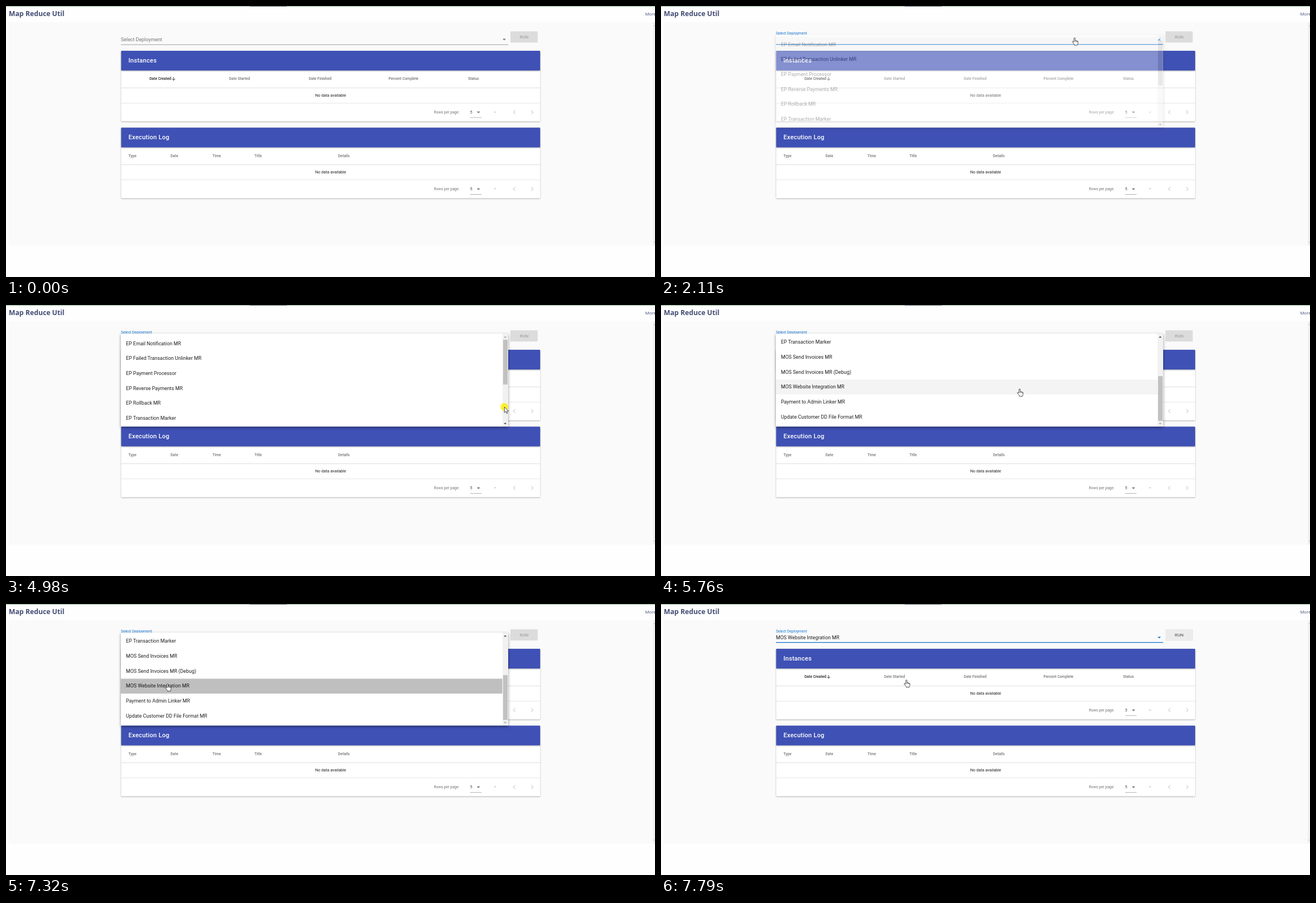
An HTML page for the animation above (8 s loop, 1158 by 484 pixels).

```html
<!DOCTYPE html>
<html lang="en">
<head>
<meta charset="utf-8">
<title>Map Reduce Util</title>
<style>
  html, body { margin: 0; width: 100%; height: 100%; overflow: hidden; background: #fefefe; }
  svg { display: block; width: 1158px; height: 484px; font-family: Roboto, "Open Sans", sans-serif; }
  .brand { font-family: "Open Sans", sans-serif; fill: #434b73; }
  .card { fill: #fff; filter: drop-shadow(0 1px 1px rgba(0,0,0,.3)); }
  .bar { fill: #3f51b5; filter: drop-shadow(0 1px 1px rgba(0,0,0,.28)); }
  .panel { fill: #fff; filter: drop-shadow(0 2px 2.5px rgba(0,0,0,.42)); }
</style>
</head>
<body>
<svg id="stage" viewBox="0 0 1158 484">
  <defs>
    <clipPath id="listClip"><rect x="205" y="51" width="681" height="166"/></clipPath>
    <clipPath id="rowClip"><rect x="205" y="133.4" width="680.6" height="26.6"/></clipPath>
  </defs>
  <rect x="5" y="29" width="1149" height="399" fill="#fafafa"/>
  <rect x="1154" y="29" width="4" height="399" fill="#f1f1f1"/>
  <path d="M1156 36l2-2v2zM1156 421l2 2v-2z" fill="#a0a0a0"/>
  <rect width="1158" height="1" fill="#83b48f"/>
  <rect x="435" width="66" height="1" fill="#4d5a5c"/>
  <text class="brand" x="5" y="18" font-size="12.2" font-weight="700">Map Reduce Util</text>
  <text class="brand" x="1140.5" y="17.3" font-size="7.8">More</text>

  <g id="page"></g>

  <g id="field">
    <text id="label" x="205"></text>
    <text id="value" x="205" y="63" font-size="8.88" fill="#212121">MOS Website Integration MR</text>
    <rect id="line" x="205" width="691"/>
    <path id="caret" d="M-3-1.5h6l-3 3z"/>
  </g>
  <g id="run">
    <rect id="runBox" x="900" y="45.3" width="48.7" height="20" rx="1"/>
    <text id="runText" x="924.5" y="58" font-size="7.77" font-weight="500" text-anchor="middle">RUN</text>
  </g>

  <g id="menu">
    <rect class="panel" x="205" y="51" width="691" height="166" rx="1"/>
    <g clip-path="url(#listClip)">
      <g id="list">
        <rect id="hover" x="205" width="681" height="26.64" fill="#f4f4f4"/>
      </g>
    </g>
    <circle id="ripple" cx="288" cy="145" fill="#000" fill-opacity=".218" clip-path="url(#rowClip)"/>
    <rect x="886" y="51" width="10" height="166" fill="#f1f1f1"/>
    <rect id="thumb" x="887" width="8" height="80"/>
    <path id="up" d="M888.2 58.3h5l-2.5-2.6z"/>
    <path id="down" d="M888.2 210.7h5l-2.5 2.6z"/>
  </g>

  <circle id="press" r="7" fill="#fbee10" fill-opacity=".85"/>
  <path id="arrow" d="M0 0V10.2L2.4 8L4.1 11.8L5.7 11.1L4.1 7.4H7.3Z"
        fill="#fff" stroke="#222" stroke-width=".8"/>
  <g id="hand" stroke="#222" stroke-width=".8" stroke-linejoin="round">
    <path fill="#fff" d="M-1.2 7.4V1a1.1 1.1 0 0 1 2.2 0V5q1.1-.8 2 .2q1.1-.5 1.7.5q1.3-.3 1.3 1.1V9.2
      q0 1.2-1 2.6V13H-.4V12Q-2.2 10-4 7.4Q-4.5 6-3.2 5.9Q-2.2 6.2-1.2 7.4Z"/>
    <path fill="none" d="M1 5v2.4M3 5.2v2.2M4.7 5.7v1.9" stroke-width=".6"/>
  </g>
</svg>
<script>
const LOOP = 8000, ROW = 26.64, BLUE = '#1976d2';
const $ = id => document.getElementById(id);

function add(parent, tag, attrs, text) {
  const el = document.createElementNS('http://www.w3.org/2000/svg', tag);
  set(el, attrs);
  if (text) el.textContent = text;
  return parent.appendChild(el);
}
function set(el, attrs) {
  for (const k in attrs) el.setAttribute(k, attrs[k]);
}
const show = (el, on) => el.setAttribute('visibility', on ? 'visible' : 'hidden');

// columns: [x, label]; the sorted column is darker and has an arrow
function card(top, title, columns, sorted) {
  const g = add($('page'), 'g', { transform: `translate(0 ${top})` });
  const rect = (x, y, width, height, more) => add(g, 'rect', { x, y, width, height, ...more });
  const text = (x, y, size, fill, s, more) => add(g, 'text', { x, y, 'font-size': size, fill, ...more }, s);
  rect(205.5, 0, 747.5, 126, { class: 'card', rx: 1 });
  rect(205.5, 0, 747.5, 35.2, { class: 'bar', rx: 1 });
  text(218.5, 21.2, 11.1, '#fff', title, { 'font-weight': 500, 'letter-spacing': '.02em' });
  for (const [x, s] of columns)
    text(x, 52.4, 6.66, s === sorted ? '#212121' : '#757575', s, { 'font-weight': 500 });
  if (sorted)
    add(g, 'path', { d: 'M299 47v5.6M296.3 50l2.7 2.7 2.7-2.7', fill: 'none', stroke: '#212121', 'stroke-width': .9 });
  for (const y of [65.8, 93]) rect(205.5, y, 747.5, .8, { fill: y < 70 ? '#d6d6d6' : '#e0e0e0' });
  text(579.3, 82, 7.2, '#212121', 'No data available', { 'text-anchor': 'middle' });
  text(763.6, 111.7, 6.66, '#757575', 'Rows per page:');
  text(828, 111.7, 6.66, '#424242', '5');
  text(870.4, 111.7, 6.66, '#757575', '–');
  add(g, 'path', { d: 'M840 108.5h6l-3 3z', fill: '#757575' });
  rect(828, 118.8, 20.6, .7, { fill: '#949494' });
  add(g, 'path', { d: 'M908.5 106.3l-3.2 3.3 3.2 3.3M937.3 106.3l3.2 3.3-3.2 3.3',
    fill: 'none', stroke: '#b4b4b4', 'stroke-width': 1 });
}

card(80, 'Instances', [[256, 'Date Created'], [398, 'Date Started'], [540.2, 'Date Finished'],
  [682.5, 'Percent Complete'], [824.5, 'Status']], 'Date Created');
card(217.2, 'Execution Log', [[218.6, 'Type'], [293.5, 'Date'], [368.5, 'Time'],
  [443.3, 'Title'], [592.5, 'Details']]);

['EP Email Notification MR', 'EP Failed Transaction Unlinker MR', 'EP Payment Processor',
 'EP Reverse Payments MR', 'EP Rollback MR', 'EP Transaction Marker', 'MOS Send Invoices MR',
 'MOS Send Invoices MR (Debug)', 'MOS Website Integration MR', 'Payment to Admin Linker MR',
 'Update Customer DD File Format MR'].forEach((s, i) =>
  add($('list'), 'text', { x: 214, y: 71.7 + i * ROW, 'font-size': 8.88, fill: '#212121' }, s));
$('label').textContent = 'Select Deployment';

const START = { arrow: null, hand: null, press: false, float: 0, focus: false, open: false,
  line: '#949494', menu: 0, hover: -1, scroll: 0, thumb: '#c1c1c1', ripple: 0, value: false, run: 0 };
const arrow = (x, y) => ({ arrow: [x, y], hand: null });
const hand = (x, y) => ({ hand: [x, y], arrow: null });

// each step changes part of the state and holds until the next
const STEPS = [
  [390, arrow(907.5, 395)],
  [520, arrow(574.5, 106)],
  [840, { ...hand(738, 57), line: '#606060' }],
  [1030, { line: '#212121' }],
  [1340, { press: true }],
  [1640, { focus: true, float: .5, line: BLUE }],
  [1800, { float: 1, press: false }],
  [1950, { open: true, menu: .08, hover: 0 }],
  [2110, { menu: .36 }],
  [2260, { menu: .8 }],
  [2420, { menu: 1 }],
  [3340, arrow(910.5, 165.3)],
  [3660, { ...arrow(926, 152), hover: -1 }],
  [3820, arrow(945, 147.5)],
  [3980, arrow(942, 157)],
  [4150, arrow(930, 170)],
  [4320, arrow(912, 180)],
  [4500, arrow(895, 182)],
  [4670, arrow(889.3, 182)],
  [4830, { press: true }],
  [5130, { press: false, scroll: 135.4, thumb: '#a8a8a8' }],
  [5760, { ...hand(640, 150), thumb: '#c1c1c1', hover: 8 }],
  [5920, { ...hand(463.5, 128), hover: 7 }],
  [6210, { ...hand(400, 125), hover: 7 }],
  [6370, { ...hand(318, 138), hover: 8 }],
  [6520, hand(288.5, 142.5)],
  [6680, { press: true }],
  [6860, { ripple: 130 }],
  [7010, { ripple: 390 }],
  [7170, { ripple: 593 }],
  [7320, { ripple: 640, press: false, value: true }],
  [7490, { menu: .6, open: false }],
  [7640, { ...hand(352, 139), menu: .12, run: .4 }],
  [7790, { ...hand(438, 135.7), menu: 0, run: 1 }],
];

function place(el, at) {
  show(el, at);
  if (at) set(el, { transform: `translate(${at})` });
}

function draw(t) {
  const s = { ...START };
  for (const [at, change] of STEPS) if (t >= at) Object.assign(s, change);

  set($('label'), { y: 63 - 12.5 * s.float, 'font-size': 8.88 - 2.22 * s.float, fill: s.focus ? BLUE : '#757575' });
  show($('value'), s.value);
  set($('line'), { y: s.focus ? 68 : 68.6, height: s.focus ? 1.3 : .9, fill: s.line });
  set($('caret'), { transform: `translate(889 60)${s.open ? ' rotate(180)' : ''}`, fill: s.focus ? BLUE : '#757575' });

  const mix = (a, b) => `rgb(${Array(3).fill(Math.round(a + (b - a) * s.run))})`;
  set($('runBox'), { fill: mix(220, 236) });
  set($('runText'), { fill: mix(166, 108) });
  $('runBox').style.filter = s.run ? 'drop-shadow(0 .6px .6px rgba(0,0,0,.15))' : 'none';

  show($('menu'), s.menu > 0);
  set($('menu'), { opacity: s.menu });
  set($('list'), { transform: `translate(0 ${-s.scroll})` });
  set($('hover'), { y: 55.4 + s.hover * ROW, opacity: s.hover < 0 ? 0 : 1 });
  set($('ripple'), { r: s.ripple });
  set($('thumb'), { y: s.scroll ? 127 : 62, fill: s.thumb });
  set($('up'), { fill: s.scroll ? '#404040' : '#a0a0a0' });
  set($('down'), { fill: s.scroll ? '#a0a0a0' : '#404040' });

  place($('arrow'), s.arrow);
  place($('hand'), s.hand);
  place($('press'), s.press && (s.arrow || s.hand));
}

const began = performance.now();
function tick() {
  draw((performance.now() - began) % LOOP);
  requestAnimationFrame(tick);
}
tick();
</script>
</body>
</html>
```
